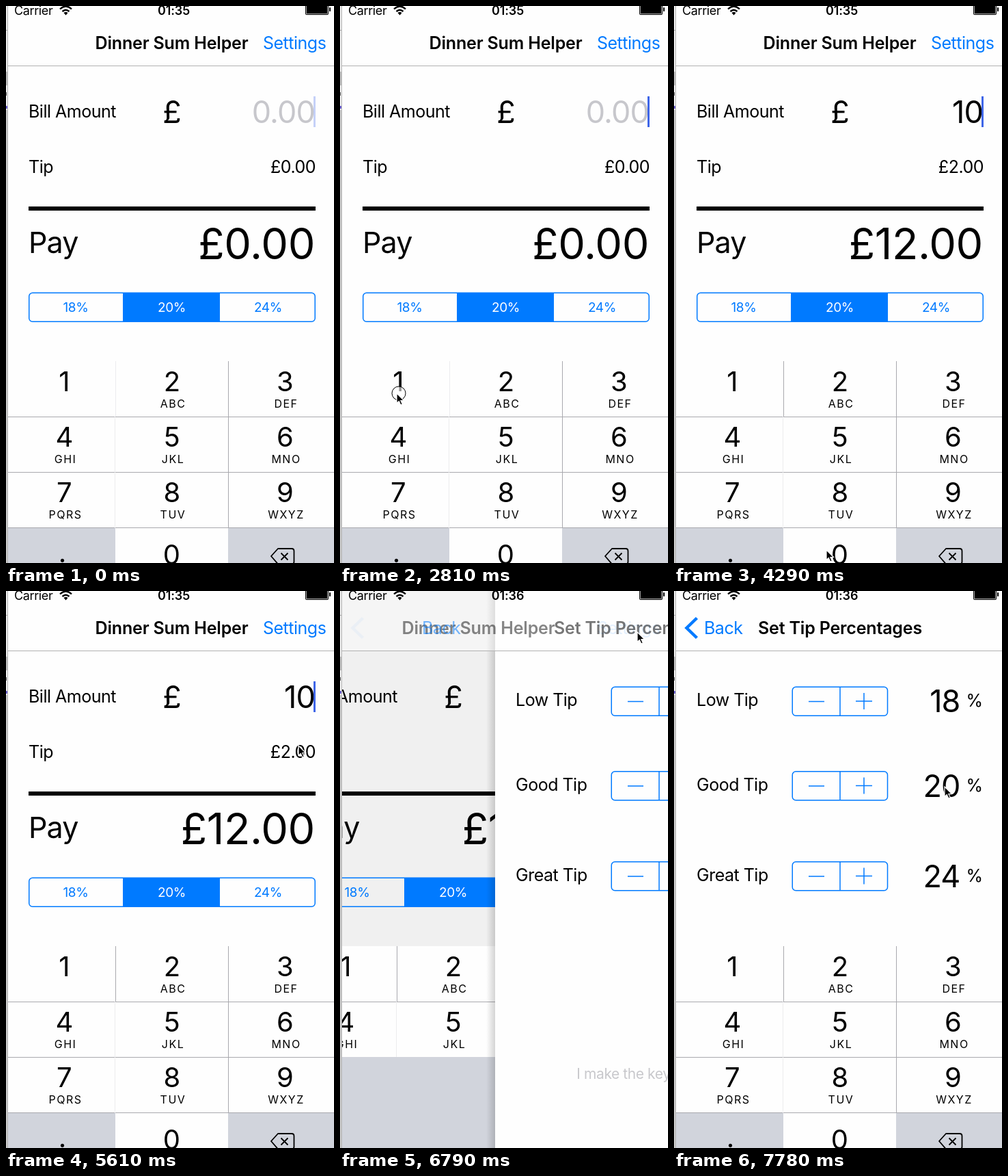
An HTML page for the animation above (8000 ms loop, 480 by 814 pixels).

```html
<!DOCTYPE html>
<html lang="en">
<head>
<meta charset="utf-8">
<title>Tip calculator</title>
<style>
html, body { margin: 0; height: 100%; overflow: hidden; background: #fefefe; }
svg { display: block; width: 100vw; height: 100vh; }
text { font-family: Inter, Roboto, sans-serif; font-size: 25px; letter-spacing: -.02em; white-space: pre; }
.blue { fill: #007aff; }
.line { fill: none; stroke: #007aff; stroke-width: 1.5; }
.bold { font-weight: 600; letter-spacing: -.007em; }
.mid { text-anchor: middle; }
.end { text-anchor: end; }
.keys { letter-spacing: 1.5px; }
.total { letter-spacing: -.006em; }
</style>
</head>
<body>
<svg id="stage" viewBox="0 0 480 814"></svg>
<script>
const BLUE = '#007aff', GREY = '#d1d4dc', RULE = '#a9a9ae';

const text = (x, y, str, cls = '', size = 25, extra = '') =>
  `<text x="${x}" y="${y}" class="${cls}" style="font-size:${size}px" ${extra}>${str}</text>`;
const rect = (x, y, w, h, fill, extra = '') =>
  `<rect x="${x}" y="${y}" width="${w}" height="${h}" fill="${fill}" ${extra}/>`;
const path = (d, extra) => `<path d="${d}" ${extra}/>`;

function keypad() {
  const cols = [85, 242.5, 408], letters = ['', 'ABC', 'DEF', 'GHI', 'JKL', 'MNO', 'PQRS', 'TUV', 'WXYZ'];
  let s = rect(3, 519, 477, 295, '#fefefe') + rect(3, 763, 157, 51, GREY) + rect(325, 763, 155, 51, GREY);
  s += rect(3, 519, 157, 81, GREY, 'id="key1"') + rect(160, 763, 165, 51, GREY, 'id="key0"');
  letters.forEach((word, i) => {
    const x = cols[i % 3], y = 563 + 81 * Math.floor(i / 3);
    s += text(x, y, i + 1, 'mid', 40) + text(x + 2, y + 24, word, 'mid keys', 16);
  });
  s += text(82, 813, '.', 'mid', 40) + text(242, 816, '0', 'mid', 40);
  for (const y of [600, 681, 762]) s += rect(3, y, 477, 1, RULE);
  s += rect(325, 519, 1, 244, RULE) + rect(159, 600, 1, 163, '#ececee') + rect(160, 519, 1, 81, RULE, 'id="divider"');
  s += path('M388 804 L398 793 H418 Q421.500 793 421.500 796.500 V812 Q421.500 815.500 418 815.500 H398 Z M402.500 799.500 l10 10 m0 -10 l-10 10',
    'fill="none" stroke="#000" stroke-width="1.800" stroke-linejoin="round"');
  return s;
}

function billView() {
  return rect(3, 0, 640, 814, '#fefefe') + rect(3, 0, 640, 814, '#000', 'id="dim"') +
    text(33, 163, 'Bill Amount') + text(242.5, 171, '£', 'mid', 45) +
    text(452, 171, '0.00', 'end', 45, 'id="bill"') + rect(450, 132, 3, 45, '#3f66e8', 'id="caret"') +
    text(33, 244, 'Tip') + text(453, 244, '', 'end', 25, 'id="tip"') +
    rect(33, 293, 420, 6, '#000') +
    text(33, 361, 'Pay', '', 43) + text(452, 369.5, '', 'end total', 63, 'id="pay"') +
    rect(171, 419, 142, 43, BLUE) +
    '<rect x="33.750" y="419.250" width="418.500" height="42" rx="5" class="line"/>' +
    text(102, 447, '18%', 'mid blue', 19) + text(242.5, 447, '20%', 'mid', 19, 'fill="#fff"') +
    text(383.5, 447, '24%', 'mid blue', 19) +
    `<g id="pad">${keypad()}</g>` + rect(3, 681, 640, 133, GREY, 'id="cover"');
}

function tipRow(y, label, value) {
  return text(33, y + 28, label) +
    `<rect x="173.250" y="${y + .25}" width="139.250" height="42" rx="5" class="line"/>` +
    path(`M243 ${y} v42 M197 ${y + 21.5} h23 M266 ${y + 21} h24 M278 ${y + 9} v24`, 'class="line"') +
    text(418.5, y + 37, value, 'end', 45) + text(427.5, y + 29, '%');
}

function settingsView() {
  return rect(-10, 0, 13, 814, 'url(#shadow)', 'id="edge"') + rect(3, 0, 477, 814, '#fefefe') +
    tipRow(140, 'Low Tip', 18) + tipRow(263.5, 'Good Tip', 20) + tipRow(395.5, 'Great Tip', 24) +
    text(241, 713, 'I make the keybosrd stay', 'mid', 21, 'fill="#c8c8cc"');
}

function navBar() {
  return rect(3, 0, 477, 87, '#fcfcfc', 'opacity=".4"') + rect(3, 87, 477, 1, '#b2b2b2') +
    text(12, 13, 'Carrier', '', 18) + text(245.5, 13, '', 'mid bold', 18, 'id="clock"') +
    '<g fill="none" stroke="#000" stroke-width="2.400">' +
    path('M79 4.500 Q87.500 -3.500 96 4.500 M82.500 8 Q87.500 3.500 92.500 8', '') + '</g>' +
    path('M84.500 10 Q87.500 7.500 90.500 10 L87.500 13.500 Z', '') +
    rect(438, -3, 34, 16, '#000', 'rx="2"') + rect(439.5, -3, 31, 14.5, 'none', 'stroke="#fff" stroke-width=".7"') +
    rect(473, 2, 2, 6, '#000', 'rx="1"') +
    text(242.5, 63, 'Dinner Sum Helper', 'mid bold', 25, 'id="title"') +
    text(376, 63, 'Settings', 'blue', 25, 'id="settings"') +
    text(243, 63, 'Set Tip Percentages', 'mid bold', 25, 'id="title2"') +
    text(44, 63, 'Back', 'blue', 25, 'id="back"') +
    path('M33.500 39.500 L18.500 54 L33.500 68.500', `id="chevron" fill="none" stroke="${BLUE}" stroke-width="4.500"`);
}

const desktop = rect(0, 0, 3, 814, '#c9c9c9') + rect(0, 0, 2, 96, '#ececec') + rect(0, 35, 2, 1, '#aaa') +
  rect(0, 96, 2, 20, '#bdbdbd') + rect(0, 116, 2, 36, '#f0f0f0') + rect(0, 126, 1, 5, '#555') +
  rect(0, 146, 2, 4, '#6a5fd0') + rect(2, 0, 1, 814, '#b4b4b4');

document.getElementById('stage').innerHTML = `
  <defs>
    <clipPath id="screen"><rect x="3" y="0" width="477" height="814"/></clipPath>
    <linearGradient id="shadow"><stop offset="0" stop-opacity="0"/><stop offset="1" stop-opacity=".35"/></linearGradient>
  </defs>
  ${desktop}
  <g clip-path="url(#screen)">
    <g id="billView">${billView()}</g>
    <g id="settingsView">${settingsView()}</g>
    <use id="pad2" href="#pad"/>
    ${navBar()}
  </g>
  <circle id="touch" r="10" fill="#fff" fill-opacity=".6" stroke="#000"/>
  <path id="mouse" d="M0 0 V14.500 L3.300 11.500 L5.800 17 L8.300 16 L5.900 10.500 H10.500 Z" stroke="#fff" stroke-width="1.200"/>`;

const LOOP = 8000, TYPE_1 = 2960, TYPE_0 = 4000;
// Screen refreshes: first, last, count
const spans = [[0, 150, 2], [450, 600, 2], [890, 1930, 8], [2080, 2520, 4], [2810, 3850, 8], [4000, 5020, 8],
  [5170, 5900, 6], [6200, 6200, 1], [6490, 6940, 4], [7120, 7120, 1], [7330, 7780, 4]];
const ticks = spans.flatMap(([a, b, n]) =>
  Array.from({ length: n }, (_, i) => Math.floor((a + (n > 1 ? (b - a) * i / (n - 1) : 0)) / 10) * 10));

const mousePath = [[890, 467, 430], [1330, 290, 445], [1930, 90, 512], [2080, 66, 540], [2370, 83, 566], [3110, 83, 566],
  [3700, 223, 795], [4430, 223, 795], [5020, 259, 459], [5310, 355, 340], [5610, 430, 222], [5900, 435, 60],
  [6790, 435, 60], [7120, 424, 218], [7480, 396, 286]];
const slide = [[0, 0], [6640, .12], [6790, .53], [6940, .88], [7120, .998], [7330, 1]];
const padDrop = [[0, 300], [7480, 200], [7630, 50], [7780, 0]];
const taps = [2810, 3850, 6490];

const last = (table, t) => table.findLast(row => row[0] <= t);
const $ = Object.fromEntries([...document.querySelectorAll('#stage [id]')].map(e => [e.id, e]));
const set = (id, name, value) => $[id].setAttribute(name, value);
const move = (id, x, y = 0) => set(id, 'transform', `translate(${Math.round(x)} ${Math.round(y)})`);
const fade = (id, value) => set(id, 'opacity', value);
const within = (t, a, b) => t >= a && t < b ? 1 : 0;

function mouseAt(t) {
  const i = mousePath.findIndex(row => row[0] > t);
  if (i < 0) return mousePath.at(-1).slice(1);
  if (!i) return [600, 0];
  const [a, ax, ay] = mousePath[i - 1], [b, bx, by] = mousePath[i], k = (t - a) / (b - a);
  return [ax + (bx - ax) * k, ay + (by - ay) * k];
}

function caretAt(t) {
  if (within(t, TYPE_1, 4700)) return 1;
  const phase = (t + (t < TYPE_1 ? 0 : 300)) % 1000;
  return last([[0, .3], [130, 0], [440, .5], [500, 1]], phase)[1];
}

function draw(t) {
  const typed = t < TYPE_1 ? '' : t < TYPE_0 ? '1' : '10';
  $.bill.textContent = typed || '0.00';
  set('bill', 'fill', typed ? '#000' : '#c7c7cc');
  $.tip.textContent = '£' + (typed * .2).toFixed(2);
  $.pay.textContent = '£' + (typed * 1.2).toFixed(2);
  $.clock.textContent = t < 5750 ? '01:35' : '01:36';
  fade('caret', caretAt(t));
  fade('key1', within(t, TYPE_1, TYPE_1 + 140));
  fade('key0', within(t, TYPE_0, TYPE_0 + 140));
  set('divider', 'fill', t < TYPE_1 ? '#ececee' : RULE);

  const p = last(slide, t)[1], q = 1 - p;
  move('billView', -145 * p);
  move('settingsView', p ? 477 * q : 600);
  fade('edge', q);
  fade('dim', .1 * p);
  fade('cover', p ? 1 : 0);
  move('title', -75 * p);
  move('title2', 404 * q);
  move('back', 162 * q);
  fade('title', q);
  fade('title2', p);
  fade('back', p);
  fade('chevron', p ** 5);
  fade('settings', t >= 6490 && !p ? .3 : q * q * q);
  move('pad2', 0, last(padDrop, t)[1]);
  set('pad2', 'visibility', t < 7480 ? 'hidden' : 'visible');

  const [x, y] = mouseAt(t);
  move('mouse', x, y);
  move('touch', x + 3, y);
  fade('touch', taps.some(tap => within(t, tap, tap + 140)) ? 1 : 0);
}

let shown = -1;
function loop(now) {
  const t = ticks.findLast(tick => tick <= now % LOOP);
  if (t !== shown) draw(shown = t);
  requestAnimationFrame(loop);
}
draw(0);
requestAnimationFrame(loop);
</script>
</body>
</html>
```
